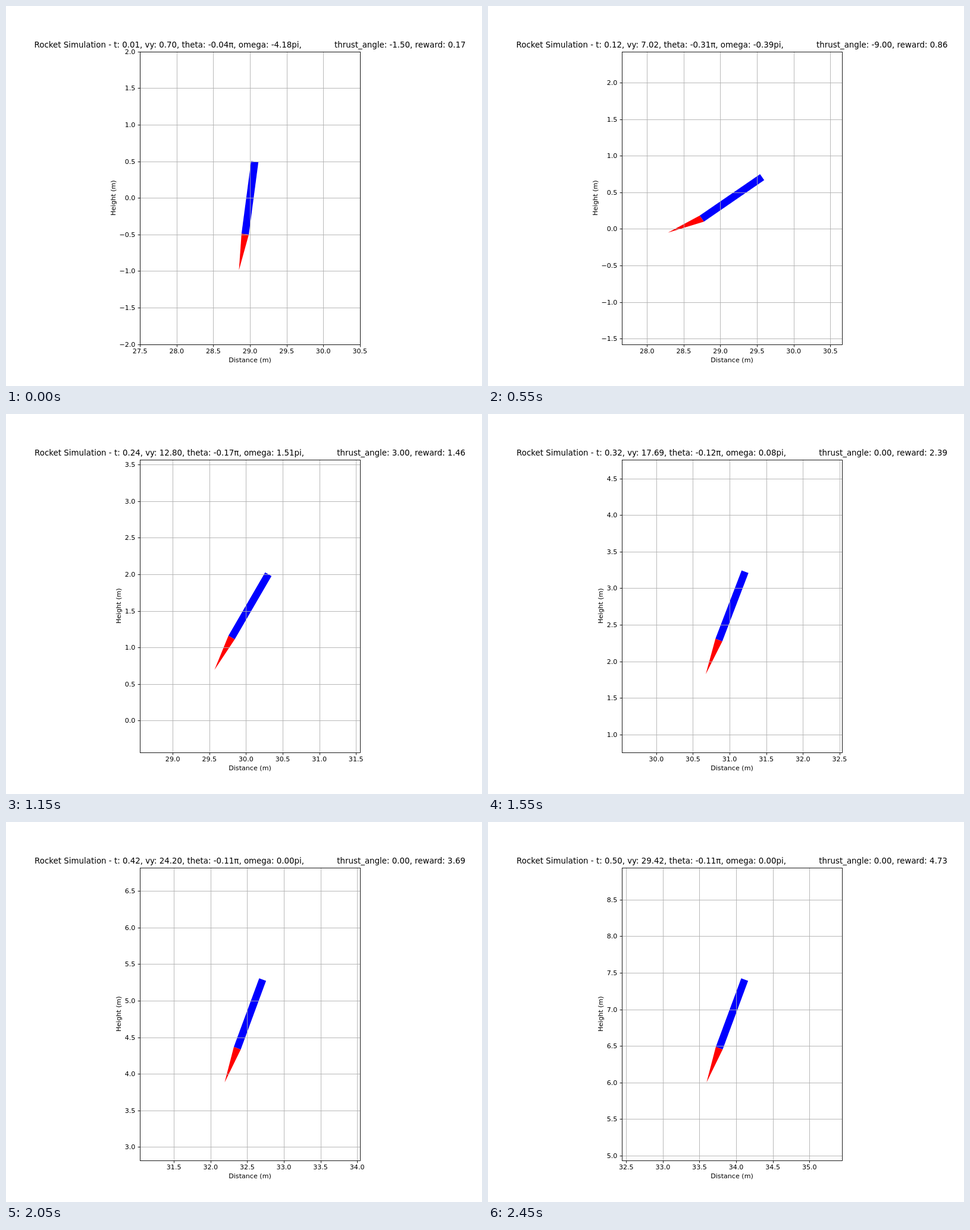
An HTML page with a canvas that plays this animation: 800x640 px, repeating every 2500 ms.

```html
<!DOCTYPE html>
<html>
<head>
<meta charset="utf-8">
<style>
  html, body { margin: 0; width: 100%; height: 100%; overflow: hidden; background: #fff; }
  canvas { display: block; }
</style>
</head>
<body>
<canvas id="stage" width="800" height="640"></canvas>
<script>
const ctx = document.getElementById('stage').getContext('2d');
const FRAMES = 50, FRAME_MS = 50, DT = 0.01;
const THRUST = 80, GRAVITY = 9.81, TORQUE = 480, START_SPIN = -4.2152 * Math.PI;
const SCALE = 123.2, CX = 410, CY = 323.2;
const LEFT = 225.2, RIGHT = 594.8, TOP = 76.8, BOTTOM = 569.6;

// Key points of the gimbal command: step, notch. The engine is straight after the last one.
const STEERING = [[0, 1], [3, 4], [5.5, 13], [9, 13], [11, 6], [12, 10], [14, 13], [16, -0.5],
  [18, 1], [19, 4], [23, -2], [24, -1], [27, -10], [31, 0], [38, -0.6]];

// Gimbal angle in degrees, turning in notches of 1.5.
function gimbal(k) {
  const i = STEERING.findIndex(p => p[0] > k - 1e-9 && p[0] > 0);
  if (i < 0) return 0;
  const [k0, a] = STEERING[i - 1], [k1, b] = STEERING[i];
  return 1.5 * Math.round(a + (b - a) * (k - k0) / (k1 - k0));
}
const radians = deg => deg * Math.PI / 180;

function simulate() {
  const states = [];
  let x = 29, y = 0, vx = 0, vy = 0, theta = 0, omega = START_SPIN;
  for (let k = 0; k < FRAMES; k++) {
    const angle = radians(gimbal(k)), push = -theta - angle / 2;
    x += vx * DT;
    y += vy * DT;
    vx += THRUST * Math.sin(push) * DT;
    vy += (THRUST * Math.cos(push) - GRAVITY) * DT;
    omega += TORQUE * Math.sin(angle) * DT;
    theta += omega * DT;
    const penalty = 1.18 * (1 - Math.exp(-((k / 13.3) ** 2.1)));
    states.push({ x, y, vy, theta, omega, reward: 0.03 + 0.2 * vy - penalty });
  }
  return states;
}
const states = simulate();

const fixed = v => v.toFixed(2).replace('-0.00', '0.00');
const tickText = v => (v < 0 ? '\u2212' : '') + Math.abs(v).toFixed(1);
const snap = v => Math.round(v) + 0.5;

function text(str, x, y, align = 'center', size = 11.11) {
  ctx.font = size + 'px "DejaVu Sans", sans-serif';
  ctx.textAlign = align;
  ctx.fillStyle = '#000';
  ctx.fillText(str, x, y);
}

function line(x0, y0, x1, y1, color) {
  ctx.strokeStyle = color;
  ctx.beginPath();
  ctx.moveTo(x0, y0);
  ctx.lineTo(x1, y1);
  ctx.stroke();
}

function polygon(points, color) {
  ctx.fillStyle = color;
  ctx.beginPath();
  points.forEach(p => ctx.lineTo(...p));
  ctx.fill();
}

// Multiples of 0.5 within the visible range.
function ticks(center, half) {
  const list = [];
  for (let i = Math.ceil((center - half) * 2 - 1e-6); i <= (center + half) * 2 + 1e-6; i++) list.push(i / 2);
  return list;
}

function drawRocket(lean, flameLean) {
  const dx = Math.sin(lean) * SCALE, dy = -Math.cos(lean) * SCALE;
  const at = (along, side) => [CX + along * dx - side * dy, CY + along * dy + side * dx];
  const bottom = at(-0.5, 0);
  const tip = [bottom[0] - Math.sin(flameLean) * SCALE / 2, bottom[1] + Math.cos(flameLean) * SCALE / 2];
  polygon([at(-0.5, -0.05), at(0.5, -0.05), at(0.5, 0.05), at(-0.5, 0.05)], '#00f');
  polygon([at(-0.5, -0.05), at(-0.5, 0.05), tip], '#f00');
}

function draw(k) {
  const s = states[k];
  ctx.fillStyle = '#fff';
  ctx.fillRect(0, 0, 800, 640);
  ctx.lineWidth = 0.89;

  const flame = radians((gimbal(k) + gimbal(k + 1)) / 2);
  drawRocket(-s.theta, -s.theta + flame);

  const xTicks = ticks(s.x, 1.5), yTicks = ticks(s.y, 2);
  for (const v of xTicks) {
    const px = CX + (v - s.x) * SCALE, sx = snap(px);
    line(sx, TOP, sx, BOTTOM, '#b0b0b0');
    line(sx, 570.5, sx, 574.4, '#000');
    text(v.toFixed(1), px, 585);
  }
  for (const v of yTicks) {
    const py = CY - (v - s.y) * SCALE, sy = snap(py);
    line(LEFT, sy, RIGHT, sy, '#b0b0b0');
    line(221.6, sy, 225.5, sy, '#000');
    text(tickText(v), 217.4, Math.round(py + 4), 'right');
  }
  ctx.strokeStyle = '#000';
  ctx.strokeRect(225.5, 77.5, 370, 493);

  text('Distance (m)', CX, 600);
  ctx.save();
  ctx.translate(yTicks[0] < 0 ? 184 : 193, CY);
  ctx.rotate(-Math.PI / 2);
  text('Height (m)', 0, 0);
  ctx.restore();

  text(`Rocket Simulation - t: ${fixed((k + 1) * DT)}, vy: ${fixed(s.vy)}, ` +
    `theta: ${fixed(s.theta / Math.PI)}π, omega: ${fixed(s.omega / Math.PI)}pi,` + ' '.repeat(13) +
    `thrust_angle: ${fixed(-gimbal(k))}, reward: ${fixed(s.reward)}`, CX, 70, 'center', 13.39);
}

function tick() {
  draw(Math.floor(performance.now() / FRAME_MS) % FRAMES);
  requestAnimationFrame(tick);
}
tick();
</script>
</body>
</html>
```
